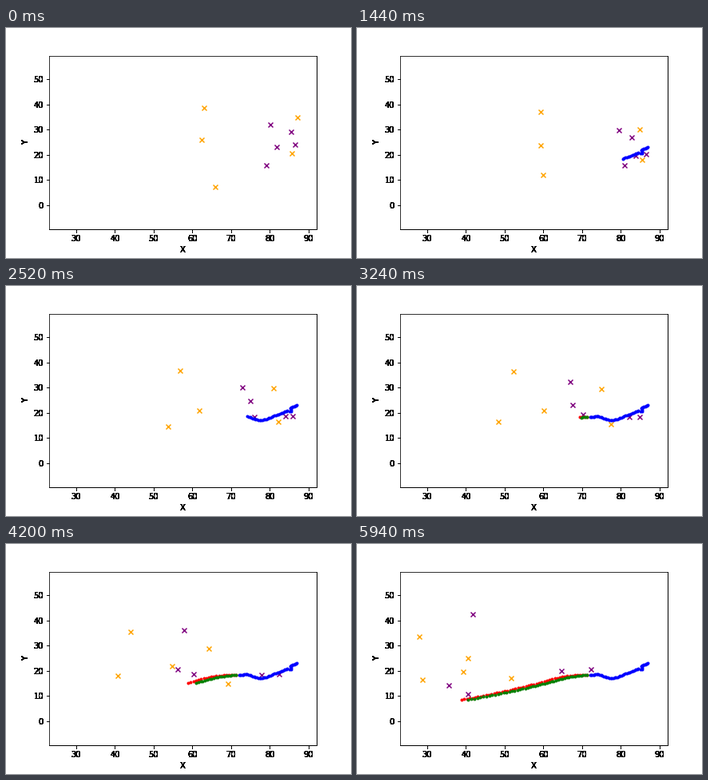
A matplotlib script for the animation above (6000 ms loop, 432 by 288 pixels).

```python
import numpy as np
import matplotlib.pyplot as plt
from matplotlib.animation import FuncAnimation

FRAMES, INTERVAL = 100, 60
W, H, DPI = 432, 288, 72
SPLIT = 50  # the two continuations start after this many ball positions

plt.rcParams["font.family"] = "DejaVu Sans"
plt.rcParams["font.size"] = 10

fig, ax = plt.subplots(figsize=(W / DPI, H / DPI), dpi=DPI, facecolor="white")
fig.subplots_adjust(left=0.125, right=0.9, bottom=0.125, top=0.88)
ax.set_xticks(range(30, 91, 10))
ax.set_yticks(range(0, 51, 10))
ax.set_xlim(23.006, 92.08)
ax.set_ylim(-9.553, 59.345)
ax.set_xlabel("X")
ax.set_ylabel("Y")


def harden(artist, times=24):
    """Draw an artist repeatedly so that its soft edges turn solid."""
    draw = artist.draw

    def draw_many(renderer):
        for _ in range(times):
            draw(renderer)

    artist.draw = draw_many


# Only what lies outside the plot area has solid edges
for axis in (ax.xaxis, ax.yaxis):
    for part in [axis.label, *axis.get_ticklabels(), *axis.get_ticklines()]:
        harden(part)
for side in ("right", "bottom"):
    harden(ax.spines[side])


def to_data(px):
    """Stage pixels (y down) to data coordinates."""
    flipped = np.column_stack([px[:, 0], H - px[:, 1]])
    return ax.transData.inverted().transform(flipped)


def smooth(keys, points, at):
    """Cubic Hermite curve through the points at the key times."""
    keys = np.asarray(keys, float)
    points = np.asarray(points, float)
    slope = np.gradient(points, keys, axis=0, edge_order=2)
    i = np.clip(np.searchsorted(keys, at, side="right") - 1, 0, len(keys) - 2)
    step = (keys[i + 1] - keys[i])[:, None]
    t = (at - keys[i])[:, None] / step
    return to_data((2 * t**3 - 3 * t**2 + 1) * points[i]
                   + (3 * t**2 - 2 * t**3) * points[i + 1]
                   + step * (t * (1 - t)**2 * slope[i]
                             + t**2 * (t - 1) * slope[i + 1]))


def straight(keys, points, at):
    """Straight runs through the points at the key times."""
    return to_data(np.column_stack(
        [np.interp(at, keys, axis) for axis in zip(*points)]))


# Players run through a few waypoints in stage pixels at shared times
RUN_KEYS = [0, 24, 42, 70, 99]
ORANGE = [
    [(248, 100), (230, 105), (218, 106), (156, 110), (78, 116)],
    [(245, 140), (230, 147), (242, 156), (208, 153), (133, 160)],
    [(262, 199), (233, 184), (203, 176), (140, 165), (82, 170)],
    [(365, 112), (354, 127), (335, 128), (254, 131), (139, 143)],
    [(358, 157), (357, 165), (341, 170), (278, 175), (193, 168)],
]
PURPLE = [
    [(331, 121), (328, 128), (296, 127), (223, 108), (145, 88)],
    [(357, 130), (344, 137), (306, 144), (215, 157), (115, 177)],
    [(326, 172), (335, 172), (311, 164), (235, 163), (139, 188)],
    [(339, 149), (349, 160), (350, 163), (320, 164), (256, 159)],
    [(362, 146), (362, 158), (359, 163), (342, 163), (293, 157)],
]

# The ball is dribbled in short straight runs, then continues twice
BALL_KEYS = [1, 8, 10, 12, 18, 22, 28, 34, 42, 50]
BALL = [(364, 149), (356, 153), (357, 157), (352, 156), (343, 160),
        (336, 162), (326, 167), (316, 168), (302, 163), (292, 164)]
TRAIL_KEYS = [51, 62, 70, 99]
RED = [(288, 164), (254, 167), (228, 174), (131, 195)]
GREEN = [(288, 164), (260, 168), (238, 174), (139, 195)]

times = np.arange(FRAMES)
late = times[SPLIT + 1:]

teams = [(ax.scatter([], [], marker="x", color=color),
          [smooth(RUN_KEYS, path, times) for path in paths])
         for color, paths in (("orange", ORANGE), ("purple", PURPLE))]
trails = [(ax.scatter([], [], marker=".", s=36, color=color), path, start)
          for color, path, start in (
              ("blue", straight(BALL_KEYS, BALL, times[1:SPLIT + 1]), 0),
              ("red", smooth(TRAIL_KEYS, RED, late), SPLIT),
              ("green", smooth(TRAIL_KEYS, GREEN, late), SPLIT))]


def update(frame):
    for dots, paths in teams:
        dots.set_offsets([path[frame] for path in paths])
    for dots, path, start in trails:
        dots.set_offsets(path[:max(frame - start, 0)])
    return [item[0] for item in teams + trails]


anim = FuncAnimation(fig, update, frames=FRAMES, interval=INTERVAL,
                     init_func=lambda: update(0), repeat=True, repeat_delay=0)
plt.show()
```
